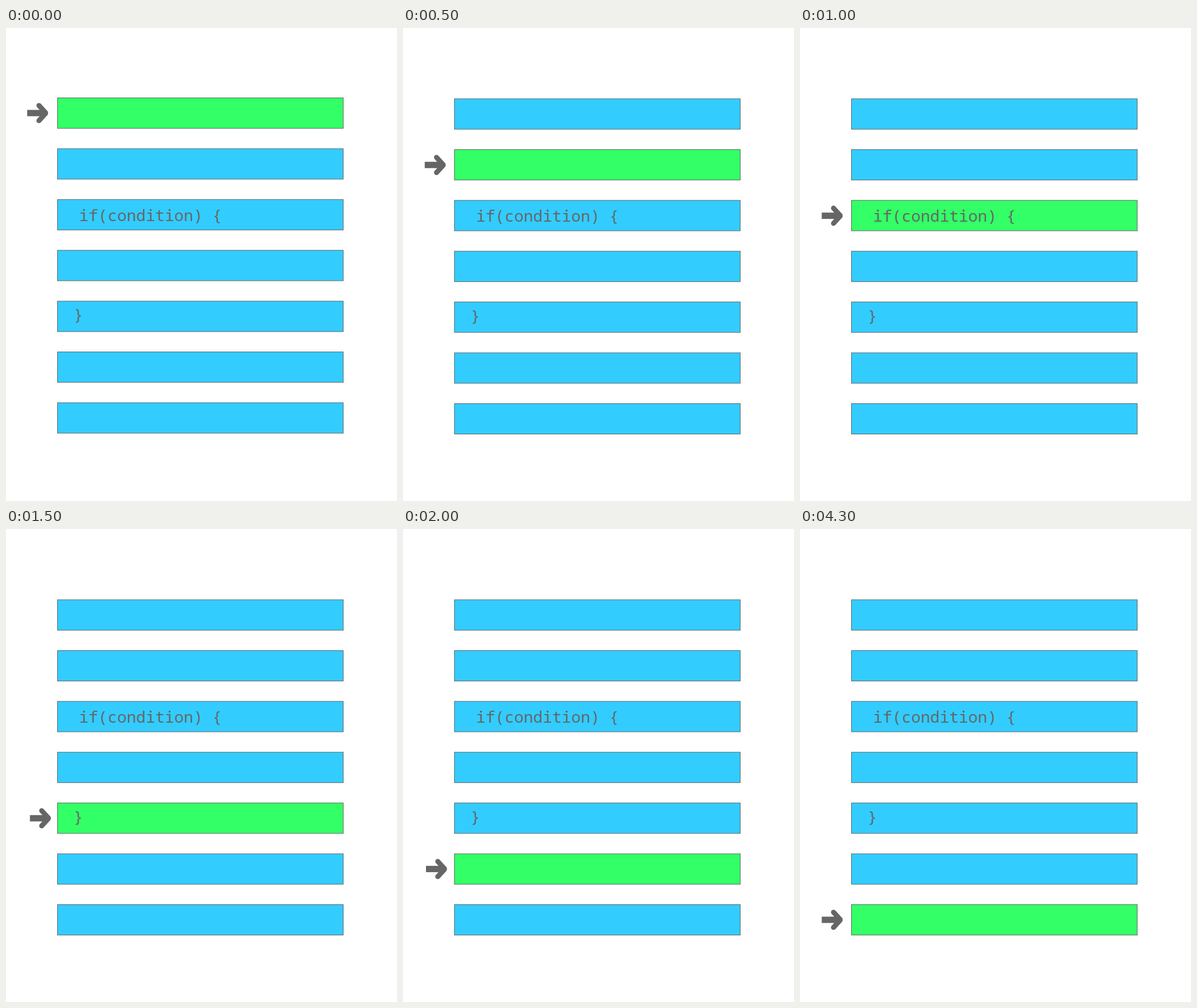
Animation, 680 px wide and 823 px high, one loop 5.5 s. Source, as an HTML page:

```html
<!DOCTYPE html>
<html lang="en">
<head>
<meta charset="utf-8">
<style>
  html, body { margin: 0; width: 100%; height: 100%; overflow: hidden; background: #fff; }
  svg { display: block; }
  rect { fill: #3cf; stroke: #666; }
  rect.active { fill: #3f6; }
  text { font: 27.6px "Noto Sans Mono", monospace; fill: #666; white-space: pre; }
</style>
</head>
<body>
<svg width="680" height="823" viewBox="0 0 680 823">
  <g id="list">
    <g id="rows"></g>
    <text x="127" y="337.2">if(condition) {</text>
    <text x="117.5" y="510.5">}</text>
  </g>
  <g id="arrow">
    <path d="M0-5.5H30V5.5H0Z" fill="#666"/>
    <path d="M20.5-13.2L32-.6V.6L20.5 13.2" fill="none" stroke="#666" stroke-width="8.8" stroke-linecap="round" stroke-linejoin="round"/>
  </g>
</svg>
<script>
const TOP = 123.1, PITCH = 88.4, LOOP = 5500, STEP = 500;
// Active row and arrow position for each step; the last one holds.
const steps = [
  { row: 0, x: 36.8, y: 148, shift: -1.5 },
  { row: 1, x: 37.8, y: 238.3, shift: 0 },
  { row: 2, x: 37.8, y: 326.7, shift: 0 },
  { row: 4, x: 41.6, y: 503.3, shift: 0 },
  { row: 5, x: 40, y: 591.6, shift: 0 },
  { row: 6, x: 37.8, y: 680, shift: 0 }
];
const byId = id => document.getElementById(id);
const move = (id, x, y) => byId(id).setAttribute("transform", `translate(${x} ${y})`);

byId("rows").innerHTML = Array.from({ length: 7 }, (_, i) =>
  `<rect x="89.5" y="${TOP + i * PITCH}" width="497" height="53"/>`).join("");
const rects = [...byId("rows").children];

function draw(now) {
  const index = Math.min(Math.floor(now % LOOP / STEP), steps.length - 1);
  const { row, x, y, shift } = steps[index];
  rects.forEach((rect, i) => rect.classList.toggle("active", i === row));
  move("list", 0, shift);
  move("arrow", x, y);
}

const start = performance.now();
function tick() {
  draw(performance.now() - start);
  requestAnimationFrame(tick);
}
tick();
</script>
</body>
</html>
```
